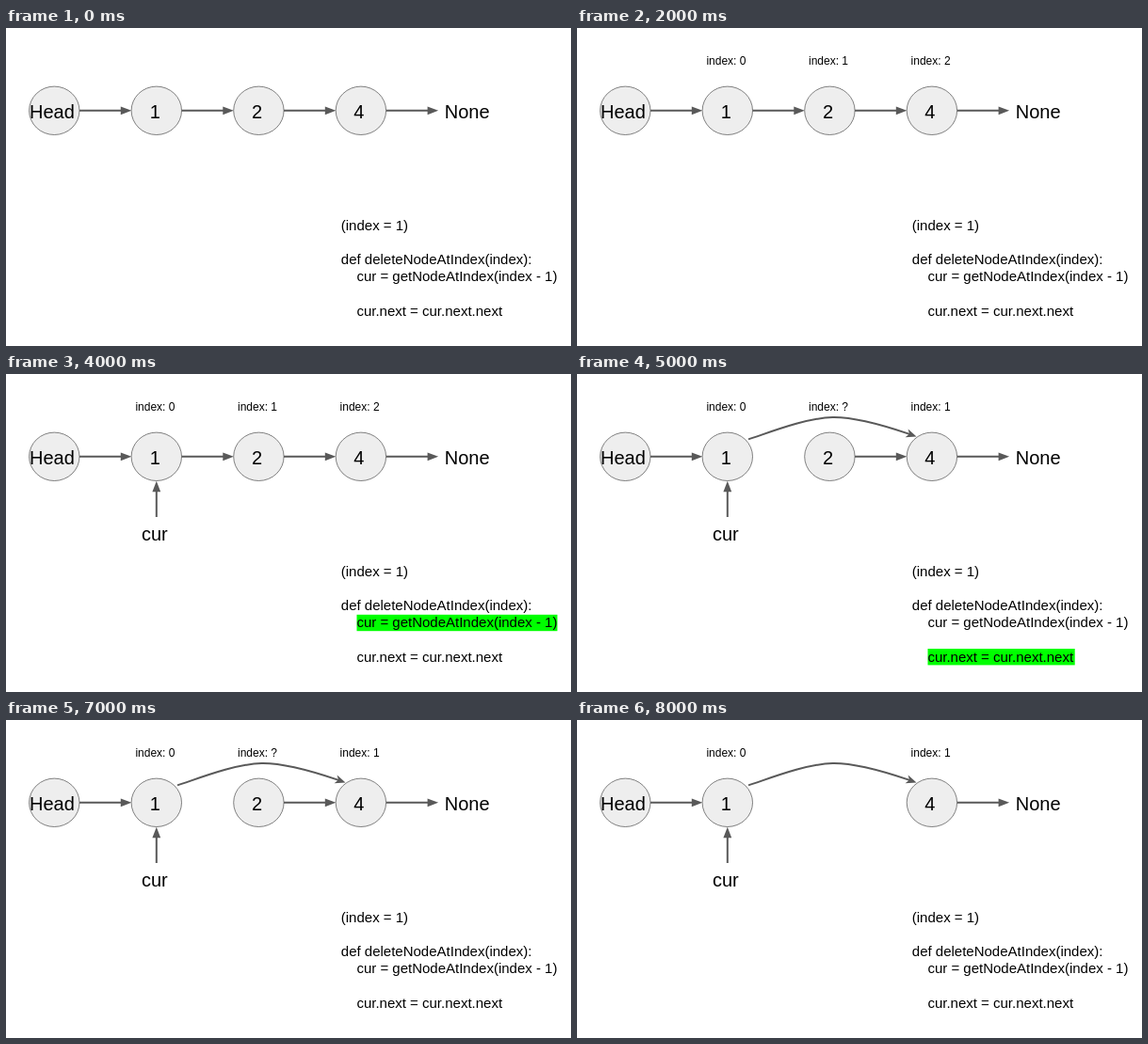
Recreate the animation shown at these times as an HTML page. Size 600x338 px, loop 10000 ms.

```html
<!DOCTYPE html>
<html lang="en">
<head>
<meta charset="utf-8">
<title>Linked list deletion</title>
<style>
html, body { margin: 0; width: 100%; height: 100%; overflow: hidden; background: #fff; }
svg { display: block; width: 100%; height: 100%; }
text { font-family: "Liberation Sans", Arial, sans-serif; fill: #000; white-space: pre; }
</style>
</head>
<body>
<svg id="stage" viewBox="0 0 600 338"></svg>
<script>
const stage = document.getElementById("stage");
const LOOP = 10000;
const GREY = "#595959";
const NODE_Y = 87.8;
const parts = [];

function add(tag, attrs, content) {
  const el = document.createElementNS("http://www.w3.org/2000/svg", tag);
  for (const key in attrs) el.setAttribute(key, attrs[key]);
  if (content) el.textContent = content;
  stage.append(el);
  return el;
}

// Shows the elements only while from <= time < to.
function during(from, to, ...els) {
  for (const el of els) parts.push({ el, from, to });
}

function label(x, y, size, content) {
  return add("text", { x, y, "font-size": size }, content);
}

function box(x, y, width, height, fill) {
  return add("rect", { x, y, width, height, fill });
}

function node(cx) {
  return add("ellipse", {
    cx, cy: NODE_Y, rx: 26.7, ry: 25.7,
    fill: "#eee", stroke: GREY, "stroke-width": 0.75
  });
}

function arrow(x, y, length, angle = 0) {
  const neck = length - 11.5;
  return add("path", {
    d: `M0 -1H${neck}V-4.4L${length} 0L${neck} 4.4V1H0Z`,
    fill: GREY, transform: `translate(${x} ${y}) rotate(${angle})`
  });
}

// Highlights lie under the text.
during(3000, 4000,
  box(246, 27.5, 42, 13.8, "#a6a6a6"),
  box(513.2, 237.6, 35.9, 17.4, "#a6a6a6"));
during(4000, 5000, box(372.5, 255.8, 213, 17.4, "#0f0"));
during(5000, 6000, box(372.5, 292, 156.2, 17.4, "#0f0"));

// Nodes and their links
for (const x of [51.3, 159.8, 376.9]) node(x);
arrow(78, NODE_Y, 55.3);
arrow(403.8, NODE_Y, 55.3);
label(25, 95.5, 20, "Head");
label(152.8, 95.5, 20, "1");
label(369.3, 95.5, 20, "4");
label(465.7, 95.5, 20, "None");

during(0, 5000, arrow(186.5, NODE_Y, 55.3));
during(0, 8000,
  node(268.4),
  label(261, 95.5, 20, "2"),
  arrow(295, NODE_Y, 55.3));

// Index labels
const indexLabel = (slot, value) => label(137.4 + slot * 108.6, 38.6, 12, "index: " + value);
during(2000, LOOP, indexLabel(0, 0));
during(2000, 5000, indexLabel(1, 1), indexLabel(2, 2));
during(5000, 8000, indexLabel(1, "?"));
during(5000, LOOP, indexLabel(2, 1));

// Current pointer
during(4000, LOOP,
  arrow(159.8, 152, 38.3, -90),
  label(144, 177, 20, "cur"));

// Link that skips the deleted node
during(5000, LOOP,
  add("path", {
    d: "M182 69.4C197 65 242 46.5 271.5 46C301 45.5 340 59.5 354 64.2",
    fill: "none", stroke: GREY, "stroke-width": 2
  }),
  add("path", {
    d: "M0 0L-11 -4.6L-8 0L-11 4.6Z",
    fill: GREY, transform: "translate(360.5 66.4) rotate(19)"
  }));

// Code
label(355.8, 215, 15, "(index = 1)");
label(355.8, 251.2, 15, "def deleteNodeAtIndex(index):");
label(372.4, 269.4, 15, "cur = getNodeAtIndex(index - 1)");
label(372.4, 305.6, 15, "cur.next = cur.next.next");

const shade = box(0, 0, 600, 338, "#000");
shade.setAttribute("opacity", 0.68);
during(3000, 4000, shade);

function render(time) {
  for (const { el, from, to } of parts) {
    el.style.display = time >= from && time < to ? "" : "none";
  }
}

const start = performance.now();
function tick() {
  render((performance.now() - start) % LOOP);
  requestAnimationFrame(tick);
}
tick();
</script>
</body>
</html>
```
